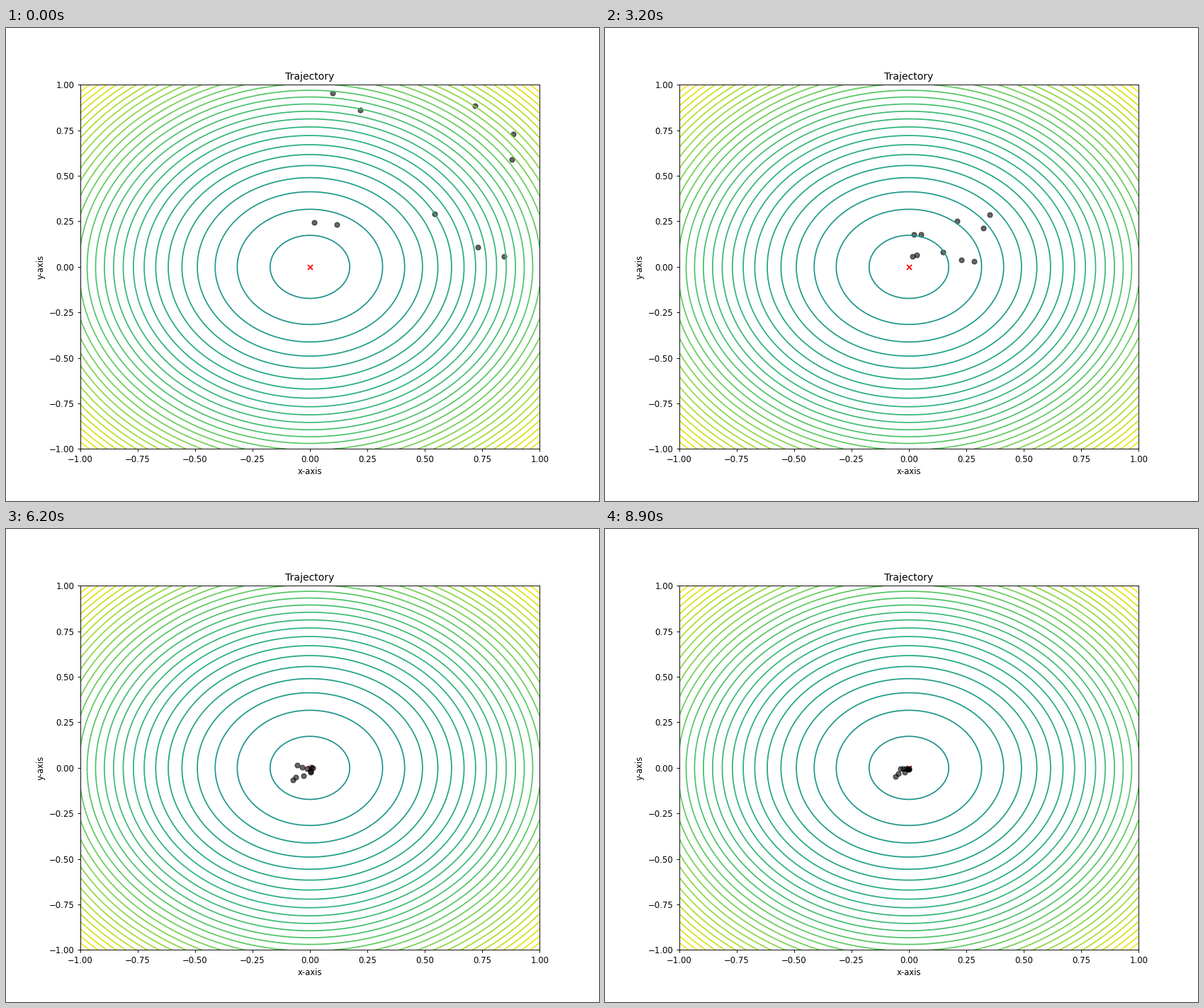
Recreate the animation shown at these times as a matplotlib script. Size 837x669 px, loop 9 s.

```python
import matplotlib.pyplot as plt
import numpy as np
from matplotlib.animation import FuncAnimation

DPI = 83.7
FRAMES, STEP_MS = 90, 100

# Where the particles begin, the slowest to settle first.
START = np.array([
    (0.885, 0.730), (0.880, 0.590), (0.845, 0.058), (0.730, 0.107),
    (0.720, 0.883), (0.544, 0.289), (0.118, 0.233), (0.020, 0.243),
    (0.220, 0.860), (0.098, 0.954),
])
rng = np.random.default_rng(4)
KICK = rng.uniform(0.2, 0.6, START.shape)
DECAY = np.linspace(0.970, 0.948, len(START))[:, None]


def swarm_at(step):
    """Damped swings around the optimum that quicken as the swarm settles."""
    cycles = step / 8.75 - 0.67 * (1 - np.exp(-step / 10))
    angle = 2 * np.pi * cycles
    return DECAY**step * (START * np.cos(angle) + KICK * np.sin(angle))


# The hair of extra size keeps the pixel count from rounding down.
fig, ax = plt.subplots(figsize=(837.01 / DPI, 669.01 / DPI), dpi=DPI)
ax.set_title("Trajectory", fontsize="large")
ax.set_xlabel("x-axis", fontsize="medium")
ax.set_ylabel("y-axis", fontsize="medium")
ax.set_xlim(-1, 1)
ax.set_ylim(-1, 1)

grid = np.linspace(-1, 0.999, 400)
xx, yy = np.meshgrid(grid, grid)
ax.contour(xx, yy, xx**2 + yy**2, levels=np.arange(-2.0, 2.0, 0.07))
ax.scatter(0, 0, color="red", marker="x")
dots = ax.scatter(*swarm_at(0).T, c="black", alpha=0.6)


def update(step):
    dots.set_offsets(swarm_at(step))
    return (dots,)


anim = FuncAnimation(fig, update, frames=FRAMES, interval=STEP_MS,
                     repeat=True, repeat_delay=0)
plt.show()
```
